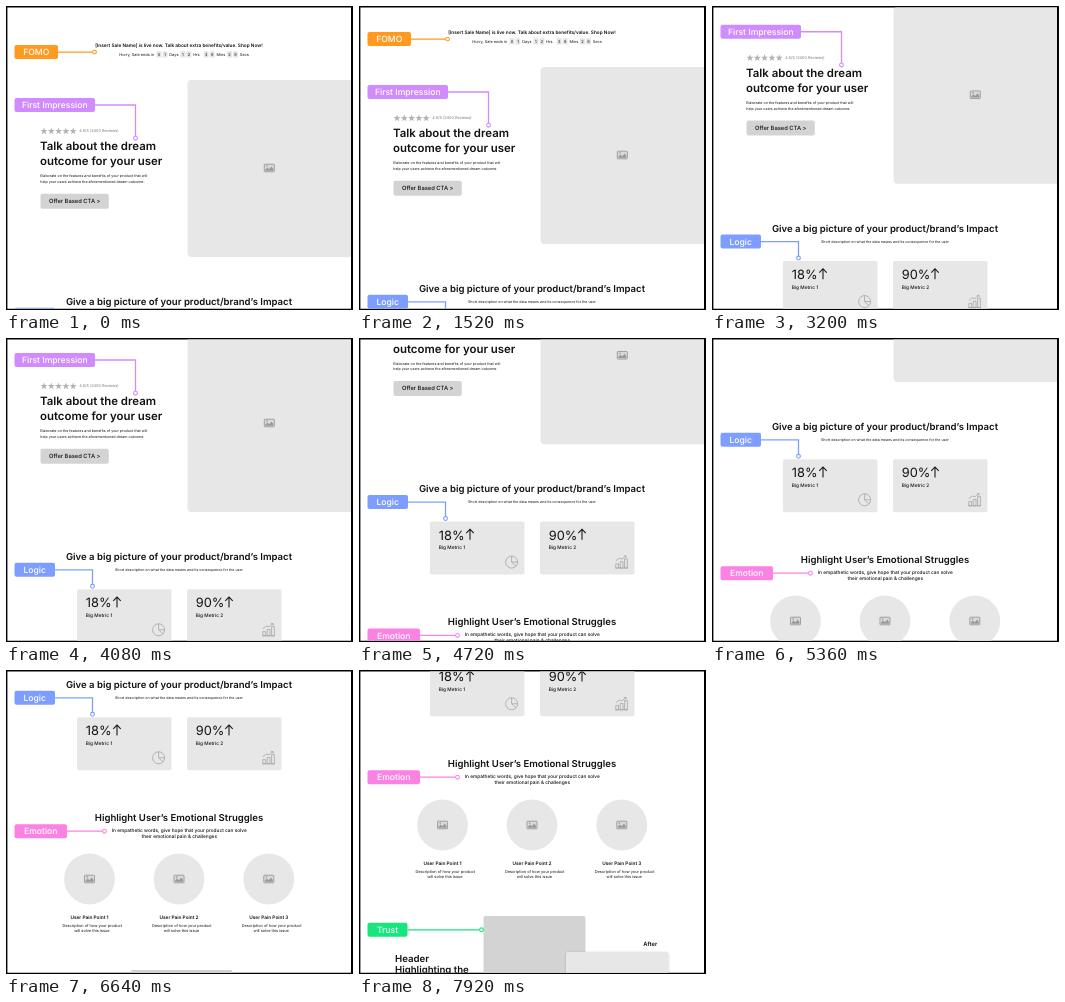
An HTML page for the animation above (8000 ms loop, 347x304 px).

```html
<!DOCTYPE html>
<html lang="en">
<head>
<meta charset="utf-8">
<title>Landing page wireframe</title>
<style>
html, body { margin: 0; width: 100%; height: 100%; overflow: hidden; background: #000; }
svg { display: block; width: 347px; height: 304px; }
text { font-family: Inter, "Liberation Sans", sans-serif; text-rendering: geometricPrecision; }
</style>
</head>
<body>
<svg viewBox="0 0 347 304">
  <defs>
    <clipPath id="view"><rect x="1.4" y="1.5" width="343.6" height="301.2"/></clipPath>
    <filter id="shadow" x="-10%" y="-10%" width="120%" height="120%">
      <feDropShadow dx="0" dy="0.5" stdDeviation="1.2" flood-opacity="0.2"/>
    </filter>
    <g id="photo">
      <rect x="-5" y="-3.8" width="10" height="7.6" rx="0.6" fill="#dadada" stroke="#999" stroke-width="0.9"/>
      <path d="M-4 2.8V1.8L-2-0.5L0 1.2L2.2-1.5L4 1.1V2.8Z" fill="#999"/>
      <circle cx="-2.3" cy="-1.9" r="0.8" fill="#999"/>
    </g>
    <path id="star" d="M0-3.7L0.9-1.2L3.5-1.1L1.45 0.5L2.2 3L0 1.55L-2.2 3L-1.45 0.5L-3.5-1.1L-0.9-1.2Z" fill="#b4b4b4"/>
    <path id="arrow" d="M0 5.3V-5.2M-3.7-1.5L0-5.3L3.7-1.5" fill="none" stroke="#111" stroke-width="1.05"/>
    <g id="pie" fill="none" stroke="#a2a2a2" stroke-width="0.75">
      <circle r="6"/>
      <path d="M0-6V0H6M0 0L4.3 4.2"/>
    </g>
    <g id="bars" fill="none" stroke="#a2a2a2" stroke-width="0.75">
      <path d="M-5.8 6V1.8H-3V6ZM-1.4 6V-0.4H1.4V6ZM3 6V-3.2H5.8V6ZM-6.3 6H6.3M-5.8-1.2L-2.3-3.8L0.2-3L4.3-6M2.2-6.2H4.5V-4.2"/>
    </g>
  </defs>
  <g clip-path="url(#view)">
    <rect width="347" height="304" fill="#fff"/>
    <g id="page"></g>
  </g>
</svg>
<script>
const page = document.getElementById('page');
const parts = [];
const add = s => parts.push(s);

// y is the middle of the capital letters
const text = (s, x, y, size, weight = 400, anchor = 'start', fill = '#111') =>
  add(`<text x="${x}" y="${y + size * 0.364}" font-size="${size}" font-weight="${weight}" text-anchor="${anchor}" fill="${fill}">${s}</text>`);
const mid = (s, x, y, size, weight) => text(s, x, y, size, weight, 'middle');
const box = (x, y, w, h, fill = '#e7e7e7', r = 2, extra = '') =>
  add(`<rect x="${x}" y="${y}" width="${w}" height="${h}" rx="${r}" fill="${fill}" ${extra}/>`);
const use = (id, x, y) => add(`<use href="#${id}" x="${x}" y="${y}"/>`);

function tag(label, y, w, color, pinX, pinY = y) {
  const x = 8.5, end = pinY > y ? `H${pinX}V${pinY - 2}` : `H${pinX - 2}`;
  add(`<path d="M${x + w} ${y}${end}" fill="none" stroke="${color}" stroke-width="1.3"/>`);
  add(`<circle cx="${pinX}" cy="${pinY}" r="1.9" fill="#fff" stroke="${color}" stroke-width="1.1"/>`);
  box(x, y - 7, w, 14, color);
  text(label, x + w / 2, y, 8.6, 500, 'middle', '#fff');
}

// Sale banner
mid('[Insert Sale Name] is live now. Talk about extra benefits/value. Shop Now!', 173, 39.2, 4.74, 600);
text('Hurry, Sale ends in', 113.3, 48.4, 3.9);
[['01', 153, 'Days'], ['12', 176.9, 'Hrs'], ['39', 200.2, 'Mins'], ['29', 223.5, 'Secs']].forEach(([digits, x, unit]) => {
  [...digits].forEach((d, i) => {
    const cx = x + i * 6;
    box(cx - 2.4, 45.2, 4.8, 6.4, '#e4e4e4', 0.7);
    mid(d, cx, 48.4, 3.9);
  });
  text(unit, x + 10.3, 48.4, 3.9);
});

// Hero
for (let i = 0; i < 5; i++) use('star', 38 + i * 7.3, 125.2);
text('4.5/5 (2400 Reviews)', 73.3, 125, 3.9, 400, 'start', '#777');
text('Talk about the dream', 34, 140, 11.43, 600);
text('outcome for your user', 34, 155.2, 11.43, 600);
text('Elaborate on the features and benefits of your product that will', 34.3, 170, 3.64);
text('help your users achieve the aforementioned dream outcome.', 34.3, 175.5, 3.64);
box(34.5, 187.7, 68.3, 15, '#d3d3d3');
mid('Offer Based CTA &gt;', 68.7, 195.1, 5.8, 500);
box(181.5, 74, 170, 177, '#e7e7e7', 4);
use('photo', 263.3, 162);

// Metrics
mid('Give a big picture of your product/brand’s Impact', 173, 295.3, 9.55, 600);
mid('Short description on what the data means and its consequence for the user', 173, 308.8, 3.6);
[[71, '18%', 111, 'pie'], [181, '90%', 223, 'bars']].forEach(([x, value, arrowX, icon], i) => {
  box(x, 328.3, 94.5, 53);
  text(value, x + 8.8, 341.6, 12.8);
  use('arrow', arrowX, 341.3);
  text(`Big Metric ${i + 1}`, x + 8.8, 354.4, 4.75, 500);
  use(icon, x + 81.6, 368.8);
});

// Pain points
mid('Highlight User’s Emotional Struggles', 173, 428.5, 9.55, 600);
mid('In empathetic words, give hope that your product can solve', 173.3, 441.3, 4.77, 500);
mid('their emotional pain &amp; challenges', 173.3, 447.3, 4.77, 500);
[83.5, 173, 262.8].forEach((x, i) => {
  add(`<circle cx="${x}" cy="490" r="25.4" fill="#e7e7e7"/>`);
  use('photo', x, 490);
  mid(`User Pain Point ${i + 1}`, x, 528.2, 4.77, 600);
  mid('Description of how your product', x + 2.8, 536.2, 3.92);
  mid('will solve this issue', x + 2.4, 541.8, 3.92);
});

// Comparison
box(124.5, 581, 102, 70, '#d3d3d3');
text('After', 284.3, 609.2, 5.85, 600);
box(207, 617, 102.5, 70, '#e7e7e7', 2, 'filter="url(#shadow)"');
text('Header', 36, 623.8, 9.65, 600);
text('Highlighting the', 36, 634.9, 9.65, 600);

tag('FOMO', 46.1, 43.5, '#ff991f', 88.5);
tag('First Impression', 99, 80.5, '#d08bff', 129.5, 132.2);
tag('Logic', 308.8, 40.5, '#7d9eff', 86.5, 325.3);
tag('Emotion', 442.2, 52.5, '#fa82e2', 98.5);
tag('Trust', 594.8, 40, '#16e67c', 122.5);

page.innerHTML = parts.join('');

// Scroll position over time: [ms, px], eased with a monotone cubic
const keys = [[0, 0], [1360, 0], [1520, 13], [1760, 27], [2400, 27], [2640, 45], [3280, 74], [3760, 74],
  [4080, 77], [5360, 207], [5760, 207], [6640, 281], [7280, 322], [7520, 322], [7920, 335], [8000, 338]];
const rate = i => keys[i + 1] ? (keys[i + 1][1] - keys[i][1]) / (keys[i + 1][0] - keys[i][0]) : 0;
const slope = i => {
  const a = i ? rate(i - 1) : 0, b = rate(i);
  return a * b > 0 ? 2 * a * b / (a + b) : 0;
};

function scrollAt(t) {
  const i = keys.findIndex((k, n) => t < keys[n + 1][0]);
  const [t0, y0] = keys[i], [t1, y1] = keys[i + 1];
  const d = t1 - t0, u = (t - t0) / d, v = 1 - u;
  return y0 * v * v * (1 + 2 * u) + y1 * u * u * (3 - 2 * u) + d * u * v * (slope(i) * v - slope(i + 1) * u);
}

const start = performance.now();
function draw() {
  const t = (performance.now() - start) % 8000;
  const step = Math.floor(t / 80) * 80;
  page.setAttribute('transform', `translate(0 ${-scrollAt(step)})`);
  requestAnimationFrame(draw);
}
draw();
</script>
</body>
</html>
```
